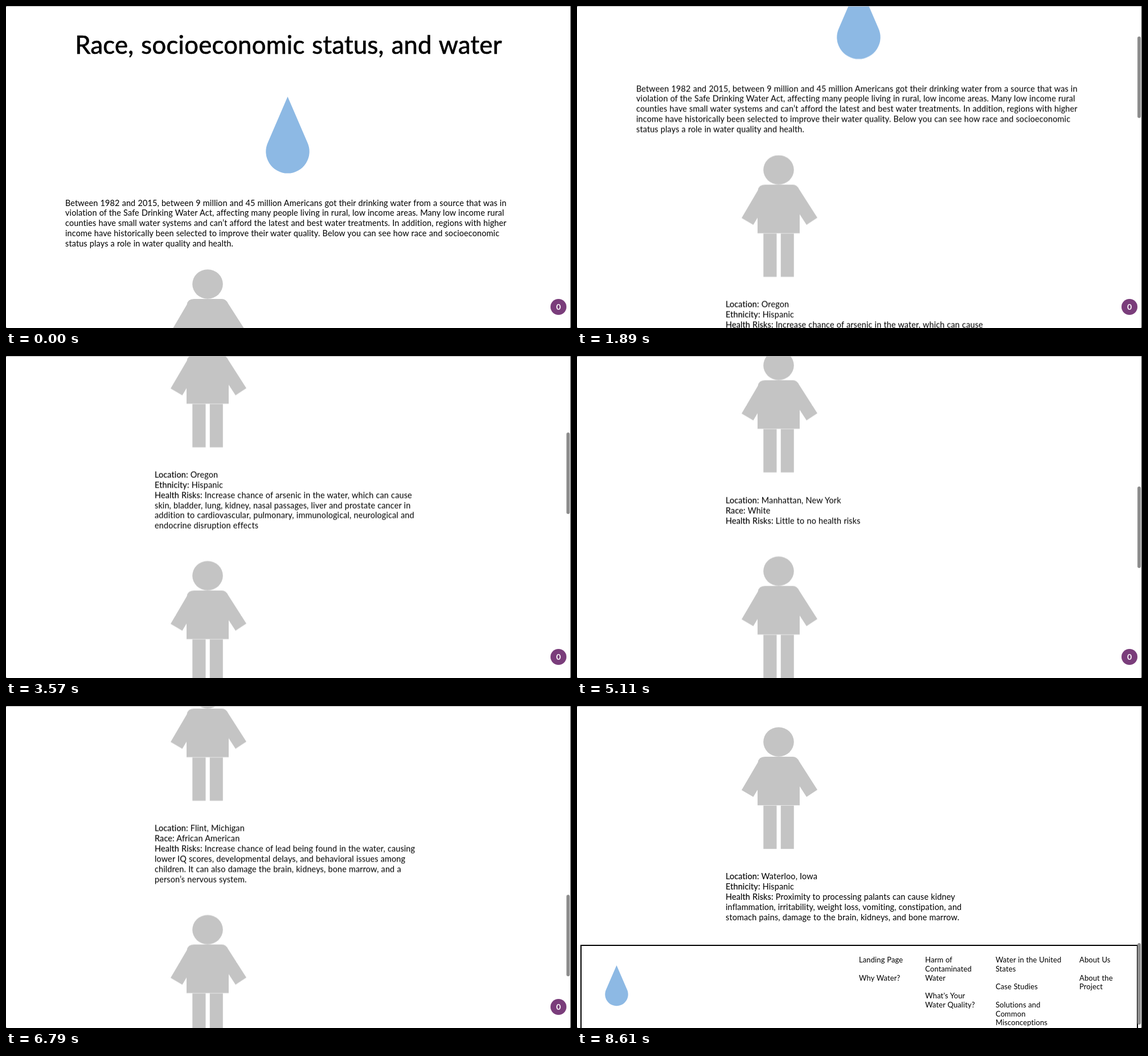
An HTML page for the animation above (9170 ms loop, 992 by 565 pixels).

```html
<!DOCTYPE html>
<html lang="en">
<head>
<meta charset="utf-8">
<title>Race, socioeconomic status, and water</title>
<style>
html, body { margin: 0; width: 100%; height: 100%; overflow: hidden; background: #333; }
#view {
  position: absolute; inset: 0; box-sizing: border-box; overflow: hidden;
  border-top: 1px solid #b4b4b4; border-right: 1px solid #2c2c2c; border-radius: 2px;
  background: #fff; color: #000;
  font: 14.5px/17.85px Lato, "Open Sans", sans-serif;
  letter-spacing: .1px; word-spacing: .25px;
}
#page, #footer { position: absolute; left: 0; top: -1px; width: 992px; will-change: transform; }
h1 {
  position: absolute; margin: 0; top: 40.5px; width: 992px; text-align: center; white-space: nowrap;
  font-size: 43.5px; line-height: 52px; font-weight: 400;
  letter-spacing: .3px; word-spacing: 1.4px; -webkit-text-stroke: .7px #000;
}
p { margin: 0; white-space: pre; }
.intro { position: absolute; left: 104px; top: 336.5px; }
.cases { position: absolute; left: 261px; top: 461.5px; }
.cases p { margin: 39.5px 0 53.4px; }
.cases svg { display: block; fill: #c4c4c4; }
b { font-weight: 400; -webkit-text-stroke: .12px #000; }
.drop { position: absolute; fill: #8db9e4; }
#badge {
  position: absolute; left: 956px; top: 513px; width: 28px; height: 28px; border-radius: 50%;
  background: #7a3d7b; color: #fff; text-align: center; font-weight: 700; font-size: 14px; line-height: 27px;
}
#footer { top: 2031px; height: 300px; }
#frame {
  position: absolute; left: 6px; top: 0; width: 979px; height: 300px; box-sizing: border-box;
  border: 2.5px solid #000; background: #fff;
}
#footer p { position: absolute; top: 19px; font-size: 13px; line-height: 15.75px; }
#thumb {
  position: absolute; left: 984px; top: 0; width: 6px; height: 143px; border-radius: 3px; background: #8e8e8e;
}
</style>
</head>
<body>
<svg width="0" height="0" style="position:absolute">
  <symbol id="person" viewBox="261 0 200 214">
    <ellipse cx="354" cy="26" rx="26.8" ry="25.8"/>
    <path d="M330 52H379Q386 52 390 60L422 110 403 122.5 391 104V137.3H317V110L309.5 122.5 289 110.5 317.5 62Q319 52 330 52Z"/>
    <path d="M327.3 137.8h23.2v76h-23.2zM357.8 137.8h23v76h-23z"/>
  </symbol>
  <symbol id="drop" viewBox="0 0 77 136">
    <path d="M38.5 0L4 80A38.2 38.2 0 1 0 73 80Z"/>
  </symbol>
</svg>

<div id="view">
  <div id="page">
    <h1>Race, socioeconomic status, and water</h1>
    <svg class="drop" style="left:455.5px;top:159px" width="77" height="136"><use href="#drop"/></svg>
    <p class="intro">Between 1982 and 2015, between 9 million and 45 million Americans got their drinking water from a source that was in
violation of the Safe Drinking Water Act, affecting many people living in rural, low income areas. Many low income rural
counties have small water systems and can’t afford the latest and best water treatments. In addition, regions with higher
income have historically been selected to improve their water quality. Below you can see how race and socioeconomic
status plays a role in water quality and health.</p>
    <div class="cases">
      <svg width="200" height="214"><use href="#person"/></svg>
      <p><b>Location:</b> Oregon
<b>Ethnicity:</b> Hispanic
<b>Health Risks:</b> Increase chance of arsenic in the water, which can cause
skin, bladder, lung, kidney, nasal passages, liver and prostate cancer in
addition to cardiovascular, pulmonary, immunological, neurological and
endocrine disruption effects</p>
      <svg width="200" height="214"><use href="#person"/></svg>
      <p><b>Location:</b> Manhattan, New York
<b>Race:</b> White
<b>Health Risks:</b> Little to no health risks</p>
      <svg width="200" height="214"><use href="#person"/></svg>
      <p><b>Location:</b> Flint, Michigan
<b>Race:</b> African American
<b>Health Risks:</b> Increase chance of lead being found in the water, causing
lower IQ scores, developmental delays, and behavioral issues among
children. It can also damage the brain, kidneys, bone marrow, and a
person’s nervous system.</p>
      <svg width="200" height="214"><use href="#person"/></svg>
      <p><b>Location:</b> Waterloo, Iowa
<b>Ethnicity:</b> Hispanic
<b>Health Risks:</b> Proximity to processing palants can cause kidney
inflammation, irritability, weight loss, vomiting, constipation, and
stomach pains, damage to the brain, kidneys, and bone marrow.</p>
    </div>
  </div>

  <div id="badge">0</div>

  <div id="footer">
    <div id="frame"></div>
    <svg class="drop" style="left:49px;top:35.5px" width="41" height="72"><use href="#drop"/></svg>
    <p style="left:495px">Landing Page

Why Water?</p>
    <p style="left:611.3px">Harm of
Contaminated
Water

What's Your
Water Quality?</p>
    <p style="left:735px">Water in the United
States

Case Studies

Solutions and
Common
Misconceptions</p>
    <p style="left:882px">About Us

About the
Project</p>
  </div>

  <div id="thumb"></div>
</div>

<script>
const LOOP = 9170, STEP = 70;
// [time in ms, scroll offset in px]; equal neighbours are pauses
const keys = [
  [0, 0], [840, 0], [1890, 200.5], [2240, 228], [2380, 228], [2590, 294], [3570, 515.5],
  [4340, 714], [4620, 714], [5110, 884.5], [6790, 1283.5], [6860, 1283.5],
  [7700, 1486], [7910, 1486], [8610, 1613], [LOOP, 1613]
];
const rate = i => keys[i + 1] ? (keys[i + 1][1] - keys[i][1]) / (keys[i + 1][0] - keys[i][0]) : 0;
// Harmonic mean keeps the curve monotone and flat at pauses
const slope = i => {
  const a = i ? rate(i - 1) : 0, b = rate(i);
  return a * b > 0 ? 2 * a * b / (a + b) : 0;
};

function scrollAt(t) {
  const i = keys.findIndex((k, n) => n === keys.length - 2 || t < keys[n + 1][0]);
  const [t0, y0] = keys[i], [t1, y1] = keys[i + 1];
  const d = t1 - t0, u = (t - t0) / d, v = 1 - u;
  return y0 * v * v * (1 + 2 * u) + y1 * u * u * (3 - 2 * u)
    + d * u * v * (slope(i) * v - slope(i + 1) * u);
}

const el = id => document.getElementById(id);
const page = el("page"), footer = el("footer"), thumb = el("thumb");

function draw() {
  const t = Math.floor(performance.now() % LOOP / STEP) * STEP;
  const y = scrollAt(t);
  page.style.transform = footer.style.transform = `translateY(${-y}px)`;
  thumb.style.transform = `translateY(${1 + y * .2566}px)`;
  thumb.style.visibility = t < 910 ? "hidden" : "visible";
  requestAnimationFrame(draw);
}
draw();
</script>
</body>
</html>
```
